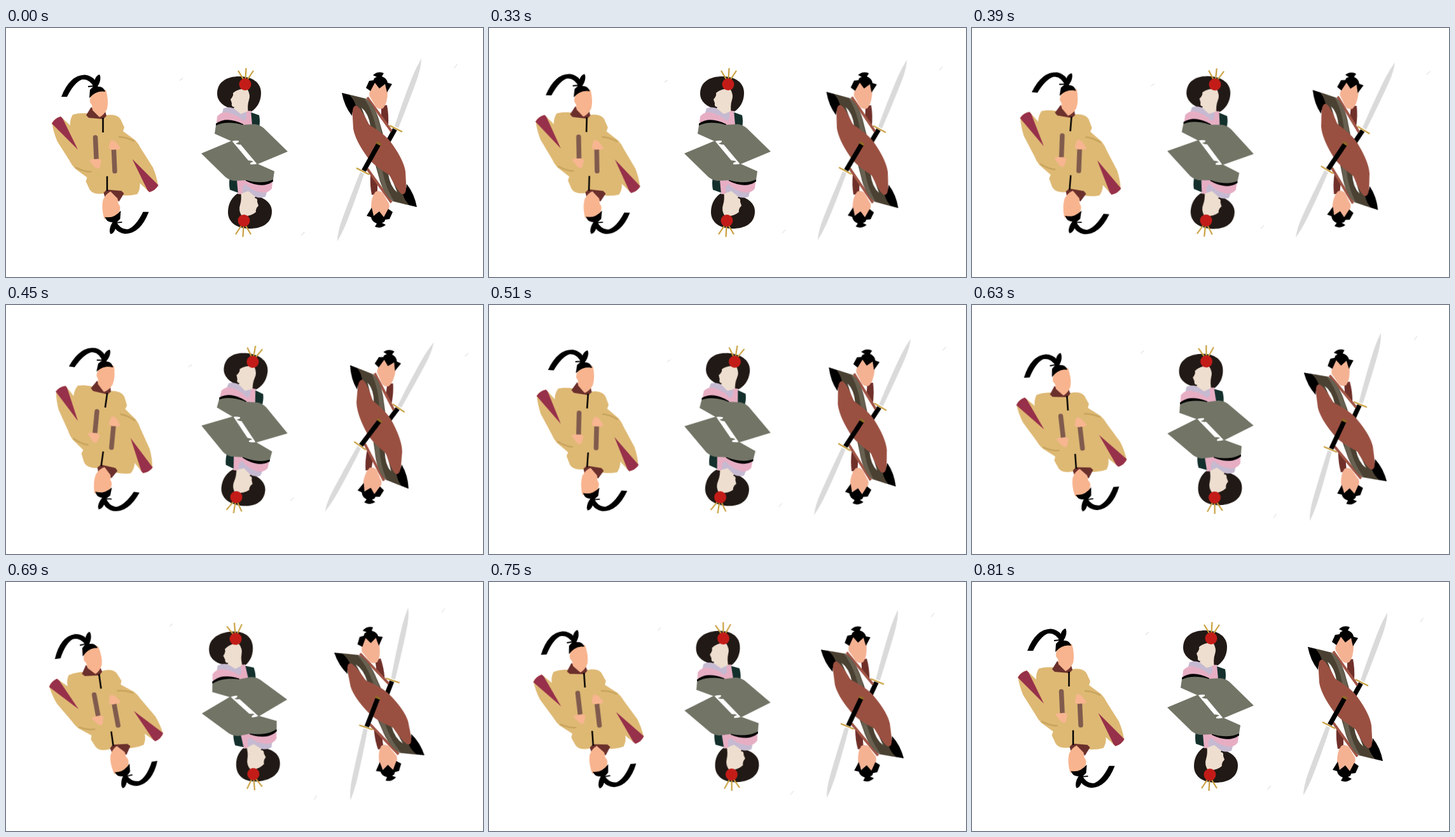
An HTML page without scripts that plays this animation: 750x391 px, repeating every 960 ms.

```html
<!DOCTYPE html>
<html lang="en">
<head>
<meta charset="utf-8">
<title>Three swaying court figures</title>
<style>
  html, body { margin: 0; width: 100%; height: 100%; overflow: hidden; background: #fff; }
  svg { display: block; width: 750px; height: 391px; }

  .noble, .lady, .warrior { animation: sway 960ms infinite; }
  .noble { transform-origin: 175.5px 187.5px; }
  .lady { transform-origin: 375px 195.5px; animation-name: late-sway; }
  .warrior { transform-origin: 587px 191.5px; }

  /* The motion advances in 30 ms ticks. */
  @keyframes sway {
    0% { transform: rotate(0deg); }
    34.375% { transform: rotate(0deg); animation-timing-function: steps(5, start); }
    50% { transform: rotate(8deg); animation-timing-function: steps(8, start); }
    75% { transform: rotate(-8deg); animation-timing-function: steps(4, start); }
    87.5%, 100% { transform: rotate(0deg); }
  }
  @keyframes late-sway {
    0% { transform: rotate(0deg); }
    37.5% { transform: rotate(0deg); animation-timing-function: steps(5, start); }
    53.125% { transform: rotate(8deg); animation-timing-function: steps(5, start); }
    68.75% { transform: rotate(-4deg); animation-timing-function: steps(2, start); }
    75% { transform: rotate(-8deg); animation-timing-function: steps(4, start); }
    87.5%, 100% { transform: rotate(0deg); }
  }

  .line { fill: none; }
  .fleck { fill: none; stroke: #d4d4d4; }
  .gold { fill: none; stroke: #c99f3e; stroke-width: 2.2; }
</style>
</head>
<body>
<svg viewBox="0 0 750 391">
  <defs>
    <path id="noble-robe" fill="#deb974" d="M72 150Q76 142 86 139L101 153Q100 144 105 136Q115 133 128 134L157 137Q174 134 180 143L186 156L184 162L203 176Q208 181 212 189L231 219Q237 233 239 247Q236 254 227 257L209 242L180 250L100 190Z"/>
    <g id="noble-half">
      <path fill="#97304a" d="M72 150Q76 142 86 139L89 142L113 191Z"/>
      <path class="line" stroke="#c7a45c" stroke-width="2.500" d="M177 171Q189 171 202 178"/>
      <path class="line" stroke="#805b4d" stroke-width="7.500" stroke-linecap="round" d="M140.500 172L142 205"/>
      <path fill="#f7b590" d="M131 208Q135 205 140 206Q148 204 150 209L147 220Q143 222 139 218Z"/>
      <path fill="#6b302c" d="M126 137L134 124L146 138L156 131L158 138L153 143L130 141Z"/>
      <path fill="#f8b48e" d="M134 103L157 97Q162 114 159 127Q154 137 147 140L136 129L135 121Q130 116 133 109Z"/>
      <path d="M131 110L132 97L138 91Q139 75 147 73Q150 77 147 86L144 92Q153 91 156 100Q142 97 131 110Z"/>
      <path d="M87 108Q100 74 124 73.500Q135 75 140 82L139 94Q131 79 119 81Q107 86 96 108Z"/>
      <path class="line" stroke="#000" stroke-width="1.800" d="M129 92L139 91"/>
      <path class="line" stroke="#000" stroke-width="2.500" d="M152.500 141V164"/>
    </g>

    <g id="lady-half">
      <path fill="#14302c" d="M384 132L398 137Q400 147 398 156L384 152Z"/>
      <path fill="#211915" d="M332 103C332 84 348 76 367 76C386 76 401 85 401 102C401 116 394 126 386 131L358 128C342 124 332 115 332 103Z"/>
      <path fill="#eedecf" d="M357 102Q365 95 379 95Q385 105 382 113Q379 122 381 134L370 138L357 128L359 124Q354 124 355 118L353 112Q358 107 357 102Z"/>
      <path fill="#c5bad1" d="M340 133L342 126Q350 123 358 126L369 135L380 131L385 150L374 148Z"/>
      <path fill="#e7aec3" d="M332 139Q339 130 350 133Q366 137 373 146L378 142V131L385 130L387 152L374 153Q350 142 331 149Z"/>
      <path d="M330 153V150Q347 138 373 151V155Z"/>
      <path fill="#727466" d="M328 166L330 153Q347 145 372 152L391 151Q399 152 405 157L443 194L395 214L369 183Q363 183 361 181Q367 180 366 177Q360 176 355 178Z"/>
      <path class="gold" d="M365 67L374 82M377.500 63L376.500 80M389 67L379 82"/>
      <circle cx="376" cy="88.500" r="9.500" fill="#c31c18"/>
    </g>

    <g id="sword">
      <path fill="#dadada" d="M653 48Q653 62 645 84Q633 117 617 157L611 154Q626 109 640 74Q646 60 653 48Z"/>
      <path class="line" stroke="#000" stroke-width="7.500" d="M611.500 159L588 201"/>
      <path class="gold" d="M603 153L623 163"/>
      <path class="line" stroke="#8f6b25" stroke-width="3.500" d="M584.500 199.500L591.500 203.500"/>
    </g>
    <g id="warrior-half">
      <path fill="#70302a" d="M590 122L599 121Q602 136 601 153L590 143Z"/>
      <path class="line" stroke="#a05445" stroke-width="4" d="M568 109L606 162"/>
      <path fill="#4a4132" d="M528 102Q547 106 566 111Q582 125 588 150L600 192L575 196L556 140L545 132Z"/>
      <path fill="#686050" d="M563 110Q576 116 582 134Q590 155 596 190L584 172Q580 135 563 110Z"/>
      <path fill="#fff" d="M559 125Q570 134 573 154L568 148Z"/>
      <path d="M528 102L540 105Q547 112 550 122Q545 126 544 138Q532 123 528 102Z"/>
      <path fill="#f4b293" d="M573 97Q575 85 588 84Q599 88 600 100Q600 118 593 126Q586 129 581 123L574 111Q569 106 573 97Z"/>
      <path d="M577 74Q585 67 594 71L591 76Q599 79 600 86L607 88L599 101L596 88L587 95L580 86L573 99L566 94L571 83L578 82Q578 78 583 77Z"/>
    </g>
    <path id="warrior-sleeve" fill="#9a5041" d="M545 130Q546 121 551 122Q558 125 571 152Q598 168 607 182Q625 207 628 225L629.500 252L612 242L570 190Z"/>
  </defs>

  <g class="noble">
    <use href="#noble-robe"/>
    <use href="#noble-robe" transform="rotate(180 155.750 198.400)"/>
    <use href="#noble-half"/>
    <use href="#noble-half" transform="rotate(180 155.750 198.400)"/>
    <path class="fleck" d="M273 82.500L278 78.500"/>
  </g>

  <g class="lady">
    <use href="#lady-half"/>
    <use href="#lady-half" transform="rotate(180 375 195.500)"/>
  </g>

  <g class="warrior">
    <use href="#sword"/>
    <use href="#warrior-half"/>
    <use href="#warrior-half" transform="rotate(180 587 191.500)"/>
    <use href="#warrior-sleeve"/>
    <use href="#warrior-sleeve" transform="rotate(180 587 191.500)"/>
    <use href="#sword" transform="rotate(180 587 191.500)"/>
    <path class="fleck" d="M704.500 63L709.500 57M464.500 326L469.500 320"/>
  </g>
</svg>
</body>
</html>
```
